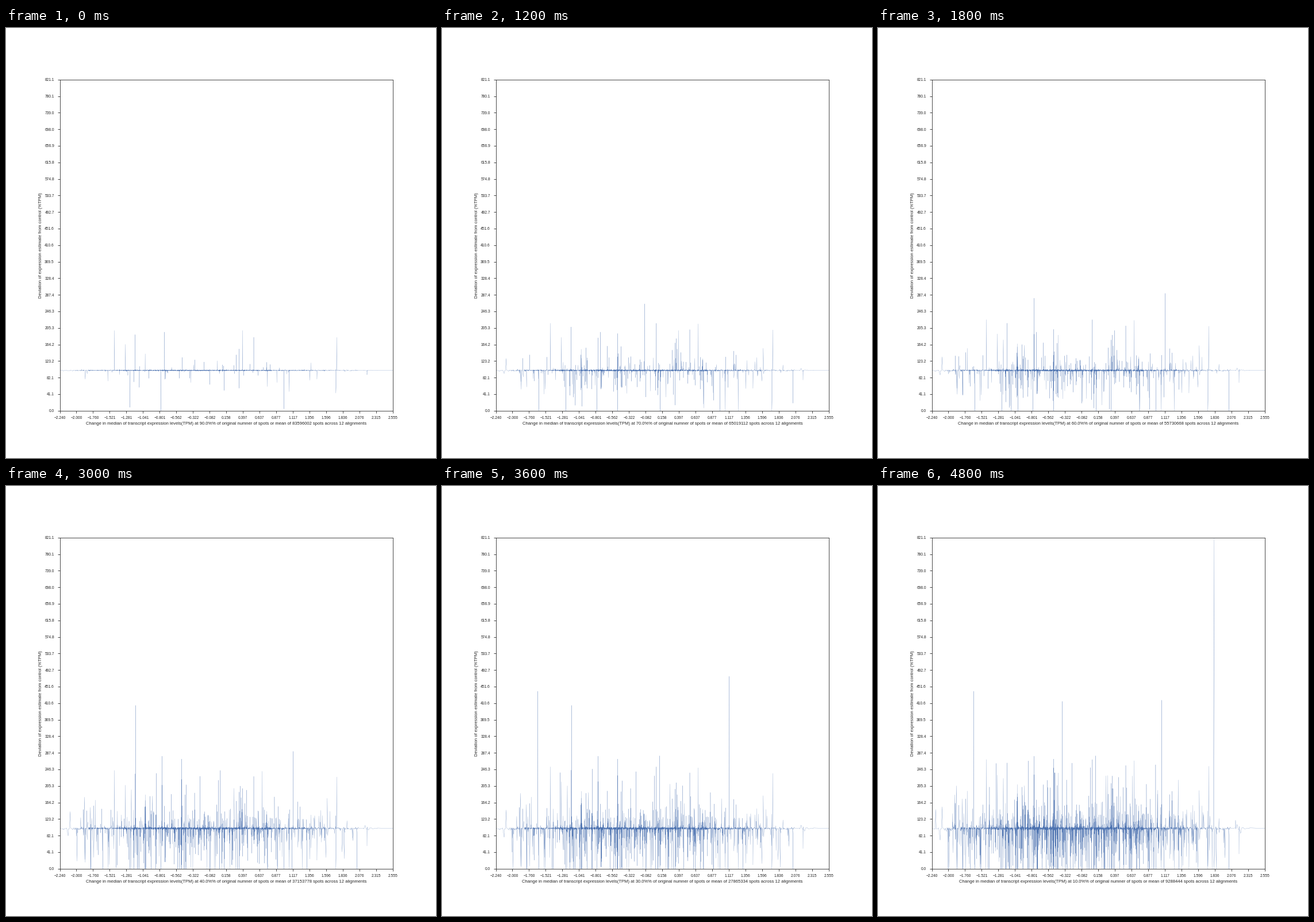
Animation, 748 px wide and 748 px high, one loop 5.4 s. Source, as a matplotlib script:

```python
import numpy as np
import matplotlib.pyplot as plt
from matplotlib.animation import FuncAnimation

SIZE, DPI = 748, 64
PX = 72 / DPI                     # points per pixel
LO, HI, TOP = -2.2399, 2.5551, 821.124
INK, BLUE = "#262626", "#4C72B0"
STEPS = 9
SPOTS = 9288444.67                # spots in a tenth of the reads
COUNT = 4500                      # transcripts

plt.rcParams["font.family"] = "Liberation Sans"

# The tallest peaks: stage x, first step, last step, level.
PEAKS = [
    (275, 1, 5, 195), (411, 1, 6, 199), (352, 2, 3, 265), (271, 4, 9, 279),
    (499, 4, 6, 291), (225, 5, 7, 405), (305, 5, 9, 272), (499, 7, 8, 477),
    (166, 7, 9, 440), (378, 7, 9, 280), (320, 9, 9, 415), (493, 9, 9, 418),
    (584, 9, 9, 819),
]


def to_data(px):
    return LO + (px + 0.5 - 0.125 * SIZE) / (0.775 * SIZE) * (HI - LO)


def build_levels():
    """Sorted transcript positions and their level at every step."""
    rng = np.random.default_rng(12)
    x = LO + (HI - LO) * rng.beta(2.3, 3.0, COUNT)
    # Ever more transcripts stray from 100% as fewer reads are kept.
    onset = (rng.random(COUNT) / 0.014) ** (1 / 1.35)
    falls = rng.random(COUNT) < 0.58
    drop = 42 * rng.exponential(1, COUNT)
    rise = 20 * rng.lognormal(0, 1.1, COUNT)
    noise = rng.normal(0, 1, COUNT)

    x = np.concatenate([x, [to_data(p[0]) for p in PEAKS], [LO, HI]])
    order = np.argsort(x)
    levels = []
    for k in range(1, STEPS + 1):
        age = k - onset
        cap = 90 + 9 * k
        down = -drop * (0.4 + 0.25 * age)
        up = cap * np.tanh(rise * (0.6 + 0.1 * age) / cap)
        stray = np.where(age >= 0, np.where(falls, down, up), 0)
        y = np.maximum(100 + (0.5 + 0.15 * k) * noise + stray, 0)
        tall = [v if a <= k <= b else 100 for _, a, b, v in PEAKS]
        levels.append(np.concatenate([y, tall, [100, 100]])[order])
    return x[order], levels


X, LEVELS = build_levels()

fig = plt.figure(figsize=(SIZE / DPI, SIZE / DPI), dpi=DPI, facecolor="white")
ax = fig.add_axes([0.125, 0.11, 0.775, 0.77])
ax.set_xlim(LO, HI)
ax.set_ylim(0, TOP)
xt, yt = np.linspace(LO, HI, 21), np.linspace(0, TOP, 21)
ax.set_xticks(xt, [f"{v:.3f}".replace("-", "\u2212") for v in xt])
ax.set_yticks(yt, [f"{v:.1f}" for v in yt])
ax.tick_params(length=4 * PX, width=0.83 * PX, pad=5.6 * PX, color=INK,
               labelcolor=INK, labelsize=6.67 * PX)
for spine in ax.spines.values():
    spine.set(color=INK, linewidth=0.83 * PX)

label = dict(fontsize=7.67 * PX, color=INK, labelpad=3.1 * PX)
ax.set_ylabel("Deviation of expression estimate from control (%TPM)", **label)
ax.set_xlabel("", **label)
line, = ax.plot(X, LEVELS[0], color=BLUE, linewidth=0.23 * PX)


def draw(i):
    tenths = STEPS - i
    line.set_ydata(LEVELS[i])
    ax.xaxis.label.set_text(
        "Change in median of transcript expression levels(TPM) at "
        f"{tenths * 10:.1f}%% of original numner of spots or mean of "
        f"{int(SPOTS * tenths)} spots across 12 alignments")
    return line, ax.xaxis.label


anim = FuncAnimation(fig, draw, frames=STEPS, interval=600, repeat=True,
                     repeat_delay=0, blit=False)
plt.show()
```
